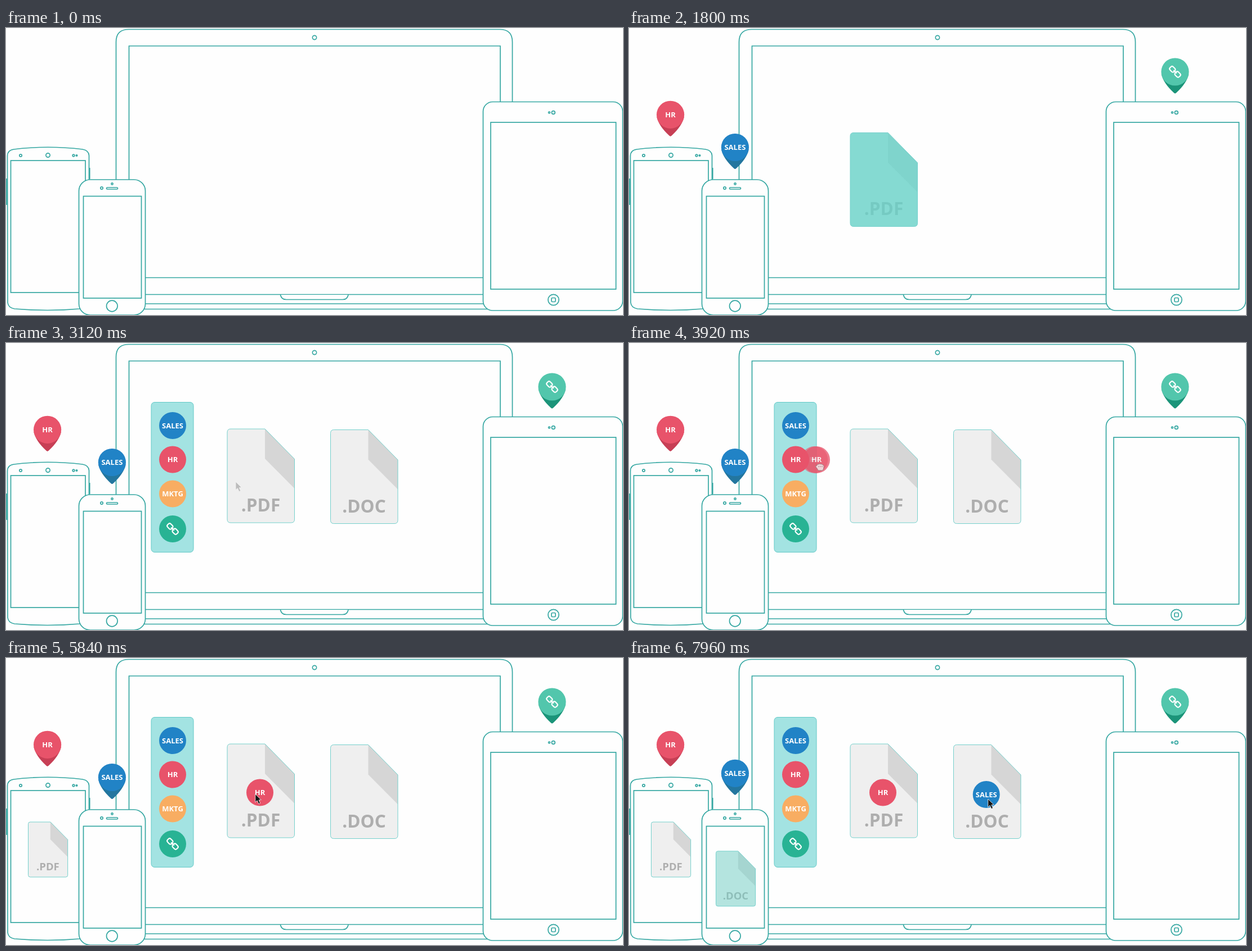
An HTML page that plays this animation: 1096x511 px, repeating every 8 s.

```html
<!DOCTYPE html>
<html lang="en">
<head>
<meta charset="utf-8">
<title>Sharing files to devices</title>
<style>
  html, body { margin: 0; width: 100%; height: 100%; overflow: hidden; background: #fefefe; }
  svg { display: block; width: 1096px; height: 511px; }
  text { font-family: "Open Sans", sans-serif; font-weight: 700; text-anchor: middle; }
  .line { fill: #fefefe; stroke: #35a7a2; stroke-width: 1.7; }
  .label { font-size: 13px; fill: #fff; }
  .ext { font-size: 31.5px; fill: #aeaeae; }
</style>
</head>
<body>
<svg viewBox="0 0 1096 511">
  <defs>
    <g id="chain" fill="none" stroke="#fff" stroke-width="2.1" transform="rotate(45)">
      <rect x="-11.5" y="-4" width="10" height="8" rx="3"/>
      <rect x="1.5" y="-4" width="10" height="8" rx="3"/>
      <path d="M-4 0H4"/>
    </g>
    <path id="sheet" d="M6 0H67L119.5 53.5V161Q119.5 167 113.5 167H6Q0 167 0 161V6Q0 0 6 0Z"/>
  </defs>

  <g class="line">
    <path d="M195.500 480V25Q195.500 2.500 218 2.500H877Q899.500 2.500 899.500 25V480"/>
    <path d="M218.500 444V32H878V444"/>
    <circle cx="548" cy="17" r="3.600"/>
    <path d="M240 444.500H860M240 474.500H860M240 491H860M240 500.500H862"/>
    <path d="M487.500 475Q489 483.500 498 483.500H598Q606.500 483.500 608 475"/>

    <path d="M2.500 228Q2.500 217.500 14 216Q74 208.500 136 216Q147 218 147.500 227V490Q147 498 131 500Q74 505 15 500Q4 498 3 489Z"/>
    <rect x="8.500" y="236" width="132.500" height="235"/>
    <circle cx="26" cy="227" r="2.200"/>
    <circle cx="74.500" cy="226.500" r="3.600"/>
    <circle cx="120" cy="227" r="1.800"/>
    <circle cx="125.500" cy="227" r="1.200"/>
    <path d="M148.700 249V269M1 268V315"/>

    <rect x="129.500" y="270" width="118" height="241" rx="20"/>
    <rect x="137.500" y="299.500" width="103" height="181.500"/>
    <circle cx="188.500" cy="277.500" r="1.600"/>
    <circle cx="170" cy="285" r="2.200"/>
    <rect x="178.500" y="284" width="20" height="3" rx="1.500"/>
    <circle cx="188.300" cy="495" r="9.800"/>

    <rect x="847.500" y="131.500" width="248" height="371.500" rx="17"/>
    <rect x="861" y="168" width="222.500" height="297"/>
    <circle cx="965" cy="150.500" r="1.500"/>
    <circle cx="972.300" cy="150.500" r="2.900"/>
    <circle cx="972.500" cy="484" r="9.600"/>
    <rect x="969" y="480.500" width="7" height="7" rx="1.500"/>
  </g>
  <g id="stage"></g>
</svg>

<script>
const LOOP = 8000, STEP = 40;
const RED = '#e8536a', BLUE = '#2183c6', ORANGE = '#f8ad62', GREEN = '#28b394';
const stage = document.getElementById('stage');

const add = html => {
  const g = document.createElementNS('http://www.w3.org/2000/svg', 'g');
  g.innerHTML = html;
  return stage.appendChild(g);
};
const place = (g, x, y, alpha = 1, scale = 1) => {
  g.setAttribute('transform', `translate(${x} ${y}) scale(${scale})`);
  g.setAttribute('opacity', alpha);
};
const clamp = v => Math.min(1, Math.max(0, v));
const span = (t, from, dur) => clamp((t - from) / dur);
const ease = p => (1 - Math.cos(Math.PI * p)) / 2;
const mix = (a, b, p) => a + (b - a) * p;

const face = name => name ? `<text class="label" y="4.500">${name}</text>` : '<use href="#chain"/>';
const disc = (fill, name, r = 24) => `<circle r="${r}" fill="${fill}"/>${face(name)}`;

function pin(x, y, top, tail, name, start, hop) {
  const g = add(`<path d="M-24.300 4Q-21 20 -2 37.500Q0 39.500 2 37.500Q21 20 24.300 4Z" fill="${tail}"/>`
    + disc(top, name, 24.6));
  // drop in, dip below the resting place, rebound, settle
  const keys = [[0, -19], [.5, 8], [.78, -3], [1, 0]];
  return t => {
    const p = span(t, start, 900);
    const i = p < .5 ? 0 : p < .78 ? 1 : 2;
    const [p0, a] = keys[i], [p1, b] = keys[i + 1];
    const dy = mix(a, b, ease((p - p0) / (p1 - p0)));
    const up = 7.8 * Math.sin(Math.PI * span(t, hop, 320));
    place(g, x, y + dy - up, span(t, start, 160));
  };
}

function doc(x, y, name, start, lift, scale, rise, fade) {
  const g = add(`<use href="#sheet" fill="#efefef"/>
    <path d="M67 0L119.500 53.500V106L67 53Z" fill="#d6d6d6"/>
    <text class="ext" x="59.500" y="147">${name}</text>
    <use class="tint" href="#sheet" fill="#62d3c8"/>
    <use href="#sheet" fill="none" stroke="#74d0cc" stroke-width="${1 / scale}"/>`);
  const tint = g.querySelector('.tint');
  return t => {
    place(g, x, y + lift * (1 - ease(span(t, start, rise))), t < start ? 0 : span(t, start - 40, 80), scale);
    tint.setAttribute('opacity', 1 - span(t, start, fade));
  };
}

function panel(start) {
  const tags = [[BLUE, 'SALES', 147], [RED, 'HR', 207.5], [ORANGE, 'MKTG', 268.5], [GREEN, '', 331]];
  const g = add('<rect x="258" y="105.500" width="75" height="267" rx="6" fill="#a3e3e2" stroke="#62c9c7"/>'
    + tags.map(([fill, name, y]) => `<g transform="translate(296 ${y})">${disc(fill, name)}</g>`).join(''));
  return t => place(g, 0, 0, span(t, start, 360));
}

// A tag carried from the panel to a file; it leaves a soft trail while moving.
function carry(fill, name, from, to, start, dur, bump) {
  const trail = add(disc(fill, name)), tag = add(disc(fill, name));
  const at = t => {
    const p = ease(span(t, start, dur));
    return [mix(from[0], to[0], p), mix(from[1], to[1], p ** 3) - bump * Math.sin(Math.PI * p)];
  };
  const draw = t => {
    const moving = t > start && t < start + dur;
    place(trail, ...at(t - 14), moving ? .6 : 0);
    place(tag, ...at(t), t <= start ? 0 : moving ? .75 : 1);
  };
  return { at, draw, start, end: start + dur };
}

const hr = [296, 207.5], sales = [296, 147];
const parts = [
  pin(73.6, 154.3, RED, '#c73f55', 'HR', 40, 4800),
  pin(188.4, 212.5, BLUE, '#23769f', 'SALES', 400, 7840),
  pin(970, 78, '#52c6ac', '#1b9479', '', 520, LOOP),
  doc(393, 153, '.PDF', 1680, 40, 1, 450, 480),
  doc(576.5, 154.5, '.DOC', 2120, 40, 1, 450, 480),
  panel(2560),
  doc(39.5, 292, '.PDF', 4800, 23, .587, 500, 205),
  doc(154.5, 324, '.DOC', 7840, 23, .587, 500, 205)
];
const first = carry(RED, 'HR', hr, [451, 239.5], 3660, 800, 0);
const second = carry(BLUE, 'SALES', sales, [634.7, 243], 6160, 1140, 4);

const arrow = add('<path d="M0 0V14.500L3.400 11.500L6 17.500L8.800 16.300L6.200 10.600L10.300 10.300Z" fill="#111" stroke="#fff" stroke-width=".8"/>');
const hand = add('<path d="M-5 2Q-6 -1 -3 -1Q-3 -4 0 -3Q2 -5 4 -3Q6 -4 7 -2Q10 -2 9 2Q9 5 7 8H-1Q-2 5 -5 2Z" fill="#f4eeee" stroke="#777" stroke-width=".8"/><path d="M0 0V2M3 0V2M6 0V2" stroke="#888"/>');

function pointer(t) {
  const drag = t < 5200 ? first : second;
  const [ox, oy] = drag === first ? [7, 12] : [3, 8];
  const [x, y] = drag.at(t);
  const held = t > drag.start && t < drag.end;
  let tip = [x + ox, y + oy];
  if (t <= drag.start) {
    const [home, begin] = drag === first ? [[408, 247], 3240] : [[458, 251.5], 5760];
    const p = ease(span(t, begin, drag === first ? 360 : 400));
    tip = [mix(home[0], tip[0], p), mix(home[1], tip[1], p)];
  }
  place(arrow, ...tip, held ? 0 : span(t, 3080, 180));
  place(hand, x + 4, y + 11, held ? .8 : 0);
}

const origin = performance.now();
function frame() {
  const now = Math.max(0, performance.now() - origin) % LOOP;
  const t = Math.floor(now / STEP) * STEP;
  parts.forEach(draw => draw(t));
  first.draw(t);
  second.draw(t);
  pointer(t);
  requestAnimationFrame(frame);
}
frame();
</script>
</body>
</html>
```
